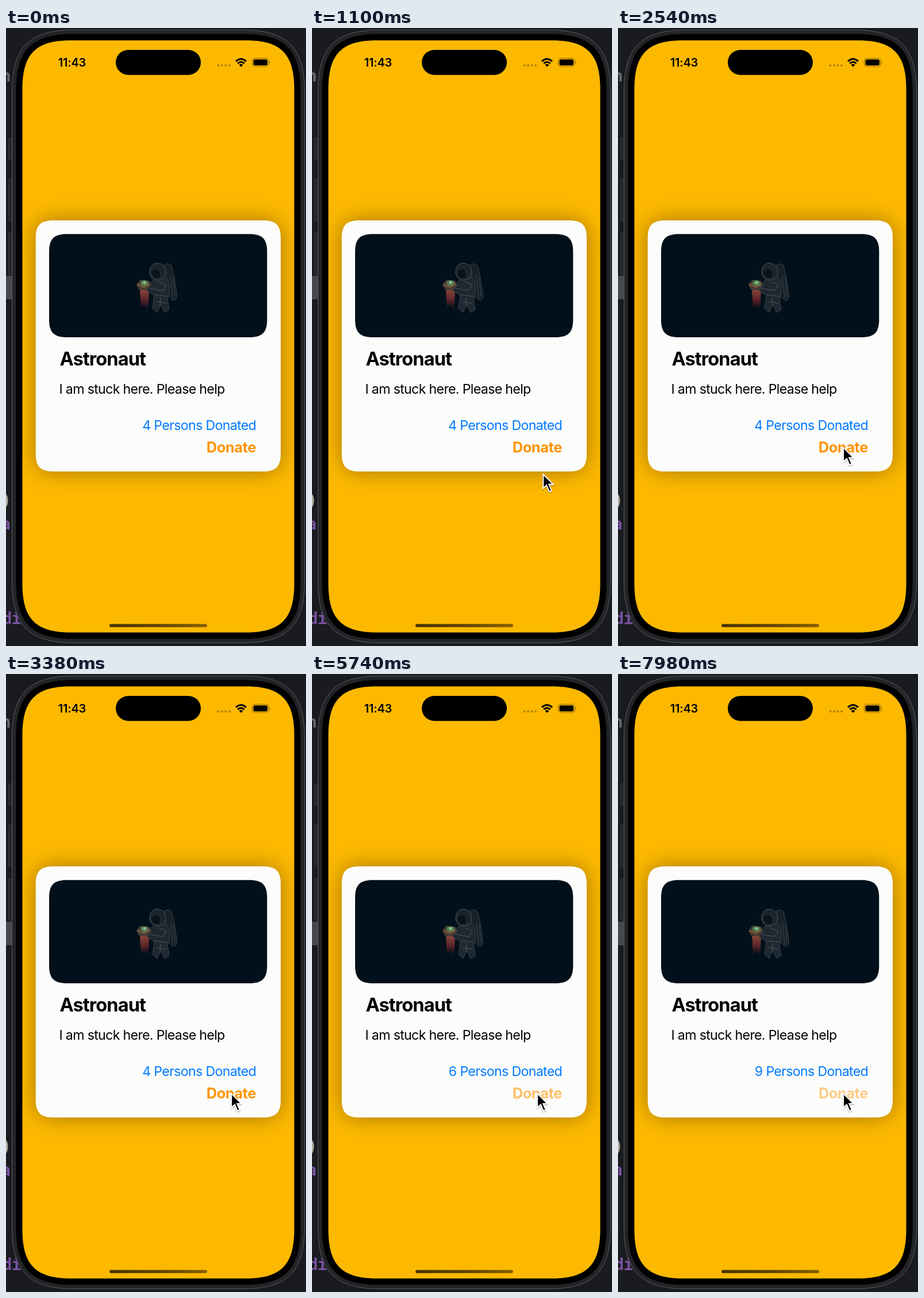
Recreate the animation shown at these times as an HTML page. Size 522 by 1073 pixels, loop 8000 ms.

```html
<!DOCTYPE html>
<html lang="en">
<head>
<meta charset="utf-8">
<title>Donation card</title>
<style>
  html, body { margin: 0; width: 100%; height: 100%; overflow: hidden; background: #191b1f; }
  svg { display: block; width: 522px; height: 1073px; }
  text { font-family: Inter, Roboto, sans-serif; }
  .code { font: 600 28px "Noto Sans Mono", "DejaVu Sans Mono", monospace; fill: #7a52a0; }
  .body { font-size: 23.2px; letter-spacing: -.69px; }
</style>
</head>
<body>
<svg viewBox="0 0 522 1073">
  <defs>
    <filter id="cardShadow" x="-25%" y="-25%" width="150%" height="150%">
      <feGaussianBlur stdDeviation="19"/>
    </filter>
    <filter id="cursorShadow" x="-50%" y="-50%" width="200%" height="200%">
      <feDropShadow dx="0" dy="1.5" stdDeviation="1.3" flood-opacity=".35"/>
    </filter>
    <linearGradient id="homeBar">
      <stop offset="0" stop-color="#493500"/>
      <stop offset=".6" stop-color="#654900"/>
      <stop offset="1" stop-color="#866100"/>
    </linearGradient>
    <linearGradient id="glow" x1="0" y1="0" x2="0" y2="1">
      <stop offset="0" stop-color="#8a4638"/>
      <stop offset=".5" stop-color="#5a2229"/>
      <stop offset="1" stop-color="#1d131d" stop-opacity=".2"/>
    </linearGradient>
    <clipPath id="screenClip"><path data-box="28.5 21.5 473 1028 66"/></clipPath>
  </defs>

  <!-- editor behind the phone -->
  <rect width="522" height="1073" fill="#191b1f"/>
  <rect y="430" width="12" height="41" fill="#47484a"/>
  <text class="code" x="-9" y="93" style="fill:#66686c">n</text>
  <text class="code" x="-8" y="829" style="fill:#aaa99c">)</text>
  <text class="code" x="-9" y="871">a</text>
  <text class="code" x="-7" y="1035">di</text>

  <!-- phone -->
  <g fill="#252629" stroke="#3b3c40">
    <rect x="4.5" y="190.5" width="8" height="37" rx="2"/>
    <rect x="4.5" y="262.5" width="8" height="72" rx="2"/>
    <rect x="4.5" y="355.5" width="8" height="72" rx="2"/>
  </g>
  <path data-box="10.5 3.5 509 1064 84" fill="#232428" stroke="#5b5c60"/>
  <path data-box="17.5 10.5 495 1050 77" fill="#000" stroke="#111"/>
  <path data-box="28.5 21.5 473 1028 66" fill="#fdb900"/>
  <rect x="191" y="38" width="148" height="43.4" rx="21.7"/>
  <rect x="180" y="1034.8" width="170" height="5.5" rx="2.75" fill="url(#homeBar)"/>

  <!-- status bar -->
  <text x="90.8" y="67" font-size="20" font-weight="600" letter-spacing="-.2">11:43</text>
  <g fill="#000" opacity=".28">
    <circle cx="369.5" cy="65" r="2.1"/><circle cx="376" cy="65" r="2.1"/>
    <circle cx="382.5" cy="65" r="2.1"/><circle cx="389" cy="65" r="2.1"/>
  </g>
  <g fill="none" stroke="#000" stroke-width="3">
    <path d="M400 57.8Q409 49.6 418 57.8"/>
    <path d="M403.3 61.5Q409 56.6 414.7 61.5"/>
  </g>
  <path d="M405.6 64Q409 61.2 412.4 64L409 67.5Z"/>
  <rect x="428.5" y="52.5" width="28.5" height="14.5" rx="4.5" fill="none" stroke="#000" stroke-opacity=".42" stroke-width="1.2"/>
  <rect x="430.5" y="54.5" width="24.5" height="10.5" rx="2.8"/>
  <path d="M458.5 57.3Q461 59.8 458.5 62.2Z" opacity=".45"/>

  <!-- card -->
  <g clip-path="url(#screenClip)">
    <path data-box="52 334 426 436 24" opacity=".36" filter="url(#cardShadow)"/>
  </g>
  <path data-box="51.7 334 426.3 436 24" fill="#fcfcfb"/>
  <path data-box="75 357.7 379.3 179.3 24" fill="#01101a"/>

  <!-- astronaut -->
  <g stroke-linejoin="round" stroke-linecap="round">
    <path d="M276 411Q283 407 288 413L293 434L297 460Q299 473 291 473L282 466Z" fill="#182027" stroke="#39424a"/>
    <path d="M286 430L290 469M291 434L294 466" fill="none" stroke="#47505a" stroke-width=".8"/>
    <path d="M233 455Q241 452 249 457L248 476L246 491L240 480L235 488Z" fill="url(#glow)"/>
    <path d="M257 437L278 433Q286 440 284 458L281 470L284 489L276 494L269 480L263 494L255 487L258 464L246 457L247 447Z" fill="#1f2830" stroke="#3d464f" stroke-width=".9"/>
    <path d="M250 425Q249 410 263 408Q277 409 278 423Q277 437 263 438Q252 437 250 425Z" fill="#1c242b" stroke="#4a535b"/>
    <path d="M252 426Q254 416 264 418Q271 422 268 434Q257 438 252 426Z" fill="#0b1219" stroke="#303941" stroke-width=".8"/>
    <path d="M266 441L279 446L273 456L249 452M258 463L281 466M269 468L268 481M262 475L279 478" fill="none" stroke="#4a555f"/>
    <path d="M227 445L234 437L249 439L253 447L245 455L231 454Z" fill="#463d36"/>
    <ellipse cx="241" cy="443" rx="7" ry="5" fill="#557e54"/>
    <path d="M229 446L240 450L249 445" fill="none" stroke="#985f3b" stroke-width="1.6"/>
    <circle cx="241" cy="442" r="2.5" fill="#8dc08a"/>
  </g>

  <text x="93.5" y="586" font-size="32.6" font-weight="700" letter-spacing="-.95">Astronaut</text>
  <text class="body" x="92.5" y="634.5">I am stuck here. Please help</text>
  <text class="body" id="count" x="435" y="698" text-anchor="end" fill="#007aff"></text>
  <text id="donate" x="435" y="737" font-size="25.5" font-weight="700" letter-spacing="-.45" text-anchor="end" fill="#ff9500">Donate</text>

  <g id="cursor" filter="url(#cursorShadow)">
    <path d="M0 0V28.5L6.4 22.5L11 33.3L16.6 31L12 20.3H20.5Z" fill="#fff"/>
    <path d="M1.8 4.3V24.2L7 19.4L11.9 30.8L14.2 29.8L9.4 18.5H16Z" fill="#000"/>
  </g>
</svg>
<script>
  const LOOP = 8000;
  const PRESSED = 0.45;
  const FADE = 320;
  const clicks = [[4420, 4540], [5580, 5700], [6530, 6640], [7090, 7200], [7600, 7710], [7950, 8100]];
  const cursorPath = [[620, 430, 1075], [1100, 401.5, 773], [1560, 391.3, 739.5], [1960, 391.3, 739.5], [2400, 391.3, 726.5]];

  const [count, donate, cursor] = ["count", "donate", "cursor"].map(id => document.getElementById(id));
  const clamp = v => Math.min(1, Math.max(0, v));
  const easeOut = v => 1 - (1 - v) ** 2;

  // Rounded box whose corners blend smoothly into the sides.
  function smoothBox(x, y, w, h, r) {
    const reach = 1.28 * r;
    const pull = reach - 0.354 * r;
    const rest = reach - pull;
    const corner = (sx, sy, turned) => turned
      ? `c0 ${sy * pull} ${sx * rest} ${sy * reach} ${sx * reach} ${sy * reach}`
      : `c${sx * pull} 0 ${sx * reach} ${sy * (reach - rest)} ${sx * reach} ${sy * reach}`;
    return `M${x + reach} ${y}H${x + w - reach}${corner(1, 1)}V${y + h - reach}`
      + `c0 ${pull} ${-rest} ${reach} ${-reach} ${reach}`
      + `H${x + reach}c${-pull} 0 ${-reach} ${-rest} ${-reach} ${-reach}`
      + `V${y + reach}c0 ${-pull} ${rest} ${-reach} ${reach} ${-reach}Z`
        .replace("", "");
  }

  function smoothPath(x, y, w, h, r) {
    const reach = 1.28 * r;
    const near = 0.354 * r;
    const [right, bottom] = [x + w, y + h];
    return `M${x + reach} ${y}H${right - reach}`
      + `C${right - near} ${y} ${right} ${y + near} ${right} ${y + reach}V${bottom - reach}`
      + `C${right} ${bottom - near} ${right - near} ${bottom} ${right - reach} ${bottom}H${x + reach}`
      + `C${x + near} ${bottom} ${x} ${bottom - near} ${x} ${bottom - reach}V${y + reach}`
      + `C${x} ${y + near} ${x + near} ${y} ${x + reach} ${y}Z`;
  }

  for (const path of document.querySelectorAll("[data-box]")) {
    path.setAttribute("d", smoothPath(...path.dataset.box.split(" ").map(Number)));
  }

  function cursorAt(t) {
    let [, x, y] = cursorPath[0];
    for (let i = 1; i < cursorPath.length; i++) {
      const [t0, x0, y0] = cursorPath[i - 1];
      const [t1, x1, y1] = cursorPath[i];
      if (t < t0) break;
      const k = easeOut(clamp((t - t0) / (t1 - t0)));
      x = x0 + (x1 - x0) * k;
      y = y0 + (y1 - y0) * k;
    }
    return [x, y];
  }

  function buttonOpacity(t) {
    const last = clicks.filter(([down]) => t >= down).pop();
    if (!last) return 1;
    const [down, up] = last;
    if (t < up) return 1 - (1 - PRESSED) * clamp((t - down) / 20);
    return PRESSED + (1 - PRESSED) * easeOut(clamp((t - up) / FADE));
  }

  function render(t) {
    const donors = 4 + clicks.filter(([, up]) => t >= up).length;
    count.textContent = `${donors} Persons Donated`;
    donate.setAttribute("opacity", buttonOpacity(t));
    cursor.setAttribute("transform", `translate(${cursorAt(t)})`);
    cursor.setAttribute("visibility", t < cursorPath[0][0] ? "hidden" : "visible");
  }

  const start = performance.now();
  function tick() {
    render((performance.now() - start) % LOOP);
    requestAnimationFrame(tick);
  }
  render(0);
  requestAnimationFrame(tick);
</script>
</body>
</html>
```
